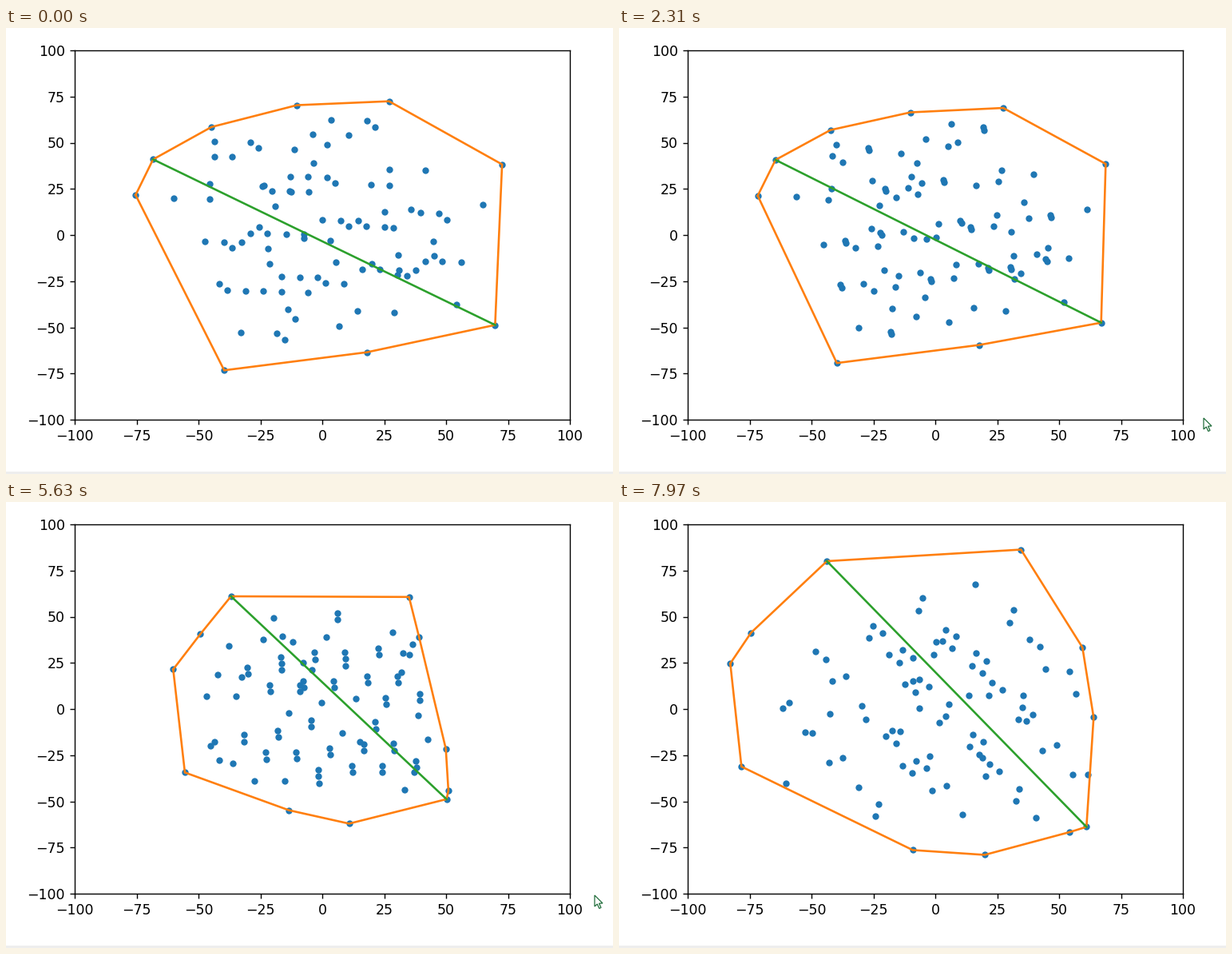
A matplotlib script that plays this animation: 760 px wide and 558 px high, repeating every 8 s.

```python
import numpy as np
import matplotlib.pyplot as plt
from matplotlib.animation import FuncAnimation
from matplotlib.patches import Polygon

W, H, DPI = 760, 558, 125
LOOP, INTERVAL, STEPS = 8000, 40, 104
COUNT = 100
TURN = 13.3  # step at which every point reverses

# Corner points in stage pixels: x, y soon after the turn, then at the end.
FALLING_IN = [
    (136.5, 206.5, 368, 224), (157.5, 162.5, 397, 175), (240, 115, 394, 191),
    (362.5, 76, 376, 258), (476, 72.5, 506, 242), (647, 171.5, 409, 159),
    (631.5, 377.5, 455, 319), (453, 425.5, 438, 241), (274, 448, 264, 264),
]
FLYING_OUT = [
    (361, 225, 139, 201.5), (412, 169, 165, 163), (328, 213, 260, 73.5),
    (507, 247, 503, 59), (380, 140.5, 580, 181.5), (345, 262, 594, 269),
    (472, 238, 586.5, 340.5), (478, 296, 585, 406), (531, 248, 564, 412.5),
    (368, 317, 457.5, 441), (325, 277, 367.5, 435), (377, 354, 153, 330.5),
]


def progress(step):
    """Steady flight after the turn that slows down once; mirrored before it."""
    return np.interp(abs(step - TURN), [0, 35, 90], [-0.083, 0.425, 1.003])


def to_data(px):
    return (px - (395.7, 258.5)) / (3.1, -2.31)


def hull_of(pts):
    """Convex hull, counter-clockwise (monotone chain)."""
    pts = sorted(map(tuple, pts))

    def chain(seq):
        out = []
        for p in seq:
            while len(out) > 1:
                (ax, ay), (bx, by) = out[-2:]
                if (bx - ax) * (p[1] - ay) - (by - ay) * (p[0] - ax) > 0:
                    break
                out.pop()
            out.append(p)
        return out[:-1]

    return np.array(chain(pts) + chain(pts[::-1]))


def inside(p, hull, margin=1.5):
    edge = np.roll(hull, -1, axis=0) - hull
    rel = p - hull
    cross = edge[:, 0] * rel[:, 1] - edge[:, 1] * rel[:, 0]
    return np.all(cross > margin * np.hypot(*edge.T))


def diameter(hull):
    gap = hull[:, None] - hull[None]
    i, j = np.unravel_index(np.argmax((gap ** 2).sum(-1)), gap.shape[:2])
    return hull[[i, j]]


def make_points():
    corners = np.array(FALLING_IN + FLYING_OUT)
    first, last = to_data(corners[:, :2]), to_data(corners[:, 2:])
    start, speed = list(first), list(last - first)
    checks = [(w, hull_of(first + w * (last - first)))
              for w in np.linspace(-0.083, 1, 12)]

    # Evenly spread 4D sequence: where a point crosses the middle, and how fast.
    ratios = 1.16730397826 ** -np.arange(1.0, 5.0)
    n = 0
    while len(start) < COUNT:
        n += 1
        a, b, c, d = 2 * ((0.5 + n * ratios) % 1) - 1
        v = 80 * np.array([c, d])
        p = 50 * np.array([a, b]) - 0.47 * v
        if all(inside(p + w * v, hull) for w, hull in checks):
            start.append(p)
            speed.append(v)
    return np.array(start), np.array(speed)


START, SPEED = make_points()

fig = plt.figure(figsize=(W / DPI, H / DPI), dpi=DPI, facecolor="white")
ax = fig.add_axes([86 / W, 68 / H, 620 / W, 462 / H])
ax.set(xlim=(-100, 100), ylim=(-100, 100))
ax.set_xticks(range(-100, 101, 25))
ax.set_yticks(range(-100, 101, 25))
dots, = ax.plot([], [], "o", color="C0", ms=4.8, mew=0)
outline, = ax.plot([], [], color="C1", lw=1.5)
longest, = ax.plot([], [], color="C2", lw=1.5)

# Overlay in stage pixels for the window edge and the pointer.
stage = fig.add_axes([0, 0, 1, 1])
stage.set(xlim=(0, W), ylim=(H, 0))
stage.axis("off")
stage.axhspan(555, 558, color="#eeeeee", lw=0)
ARROW = np.array([(0, 0), (0, 14), (3.3, 11), (5.8, 16.5), (8, 15.5),
                  (5.6, 10.2), (10, 10)])
pointer = Polygon(ARROW, fc="white", ec="#1d6b38", lw=0.7)
stage.add_patch(pointer)


def pointer_tip(step):
    """Slides in, rests, nudges aside, then leaves downwards."""
    keys = [6, 7, 70, 72, 74, 77]
    return (np.interp(step, keys, [728, 732, 732, 737, 737, 745]),
            np.interp(step, keys, [507, 488, 488, 492, 492, 545]))


def draw(i):
    step = int((i * INTERVAL + 32) * STEPS / LOOP)
    pts = START + progress(step) * SPEED
    hull = hull_of(pts)
    dots.set_data(*pts.T)
    outline.set_data(*np.vstack([hull, hull[:1]]).T)
    longest.set_data(*diameter(hull).T)
    pointer.set_xy(ARROW + pointer_tip(step))
    pointer.set_visible(6 <= step <= 77)
    return dots, outline, longest, pointer


anim = FuncAnimation(fig, draw, frames=LOOP // INTERVAL, interval=INTERVAL,
                     repeat=True, repeat_delay=0)
plt.show()
```
